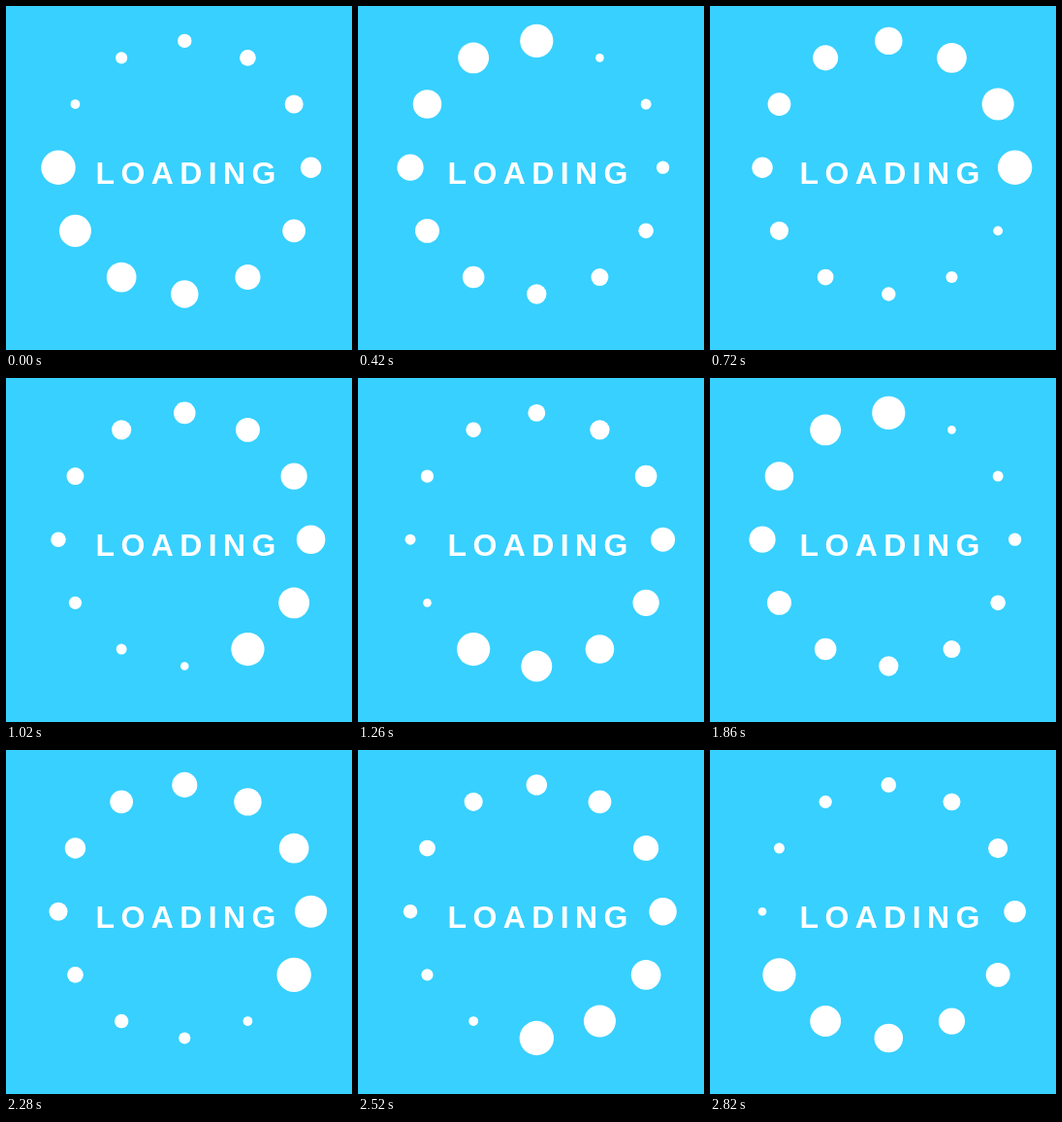
Write an HTML page that moves like this. It is 357 by 354 pixels and loops after 2880 ms.

```html
<!DOCTYPE html>
<html lang="en">
<head>
<meta charset="utf-8">
<title>Loading</title>
<style>
html, body { margin: 0; width: 100%; height: 100%; overflow: hidden; background: #38d0fe; }
svg { display: block; fill: #fff; }
text { font: bold 32px "Liberation Sans", Arial, sans-serif; letter-spacing: .2em; }
</style>
</head>
<body>
<svg width="357" height="354" viewBox="0 0 357 354">
  <text x="92.5" y="183">LOADING</text>
</svg>
<script>
const COUNT = 12, TURN = 1440, TICK = 60;
const svg = document.querySelector('svg');

// Dots run clockwise, starting at nine o'clock.
const dots = Array.from({ length: COUNT }, (_, i) => {
  const dot = document.createElementNS(svg.namespaceURI, 'circle');
  const angle = Math.PI + i * 2 * Math.PI / COUNT;
  dot.setAttribute('cx', 184.3 + 130.3 * Math.cos(angle));
  dot.setAttribute('cy', 166.2 + 130.3 * Math.sin(angle));
  return svg.appendChild(dot);
});

function draw(now) {
  const head = Math.floor(now / TICK) * TICK % TURN / TURN * COUNT;
  dots.forEach((dot, i) => {
    const age = (head - i + COUNT) % COUNT;
    dot.setAttribute('r', 17.7 - 1.165 * age);
  });
}

const start = performance.now();
function loop() {
  draw(performance.now() - start);
  requestAnimationFrame(loop);
}
loop();
</script>
</body>
</html>
```
